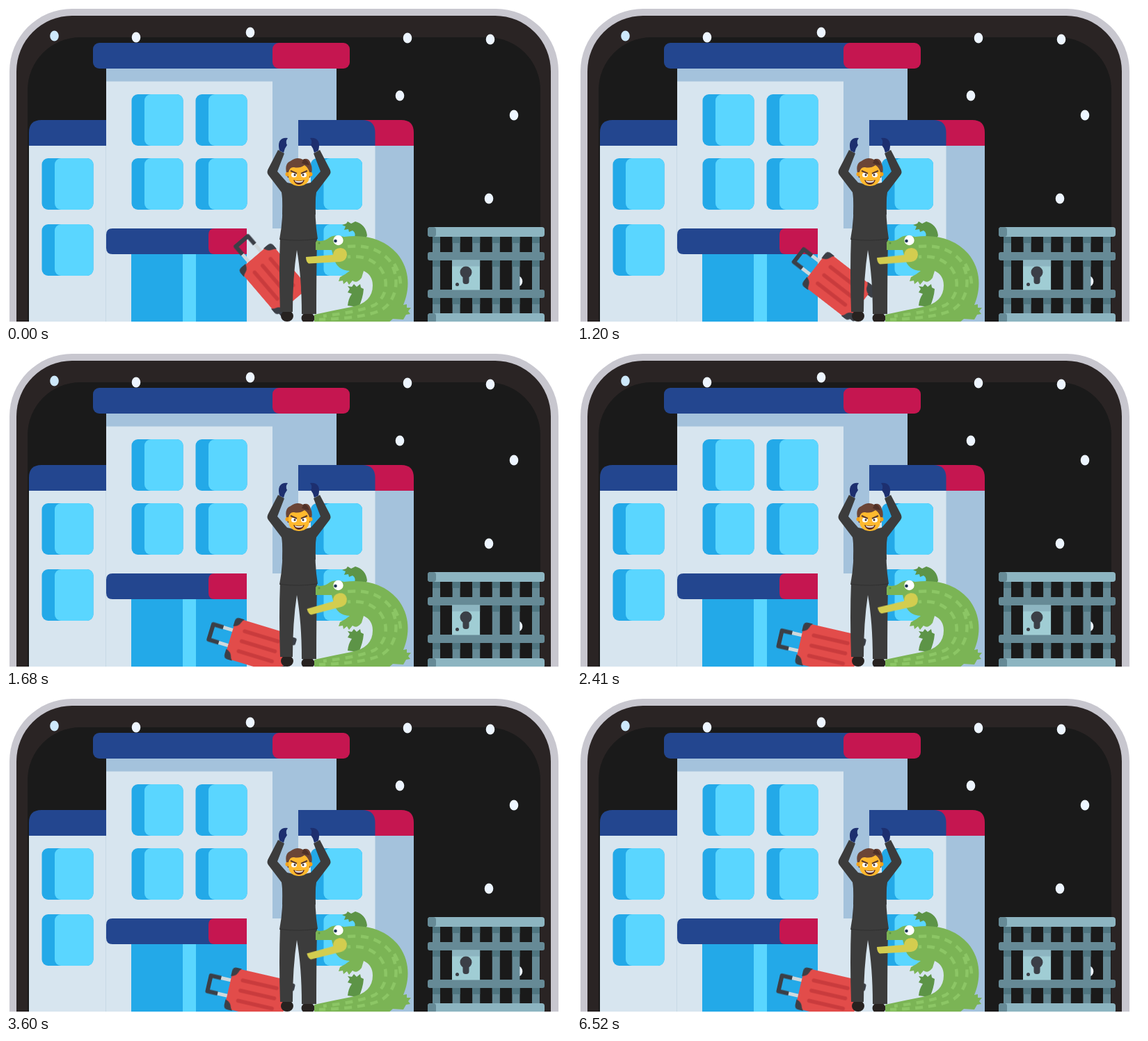
Recreate the animation shown at these times as an HTML page. Size 812x456 px, loop 6.97 s.

```html
<!DOCTYPE html>
<html lang="en">
<head>
<meta charset="utf-8">
<title>Night at the hotel</title>
<style>
  html, body { margin: 0; width: 100%; height: 100%; overflow: hidden; background: #fff; }
  svg { display: block; width: 812px; height: 456px; }
  .navy { fill: #23468f; }
  .red { fill: #c51650; }
  .wall { fill: #d7e5ef; }
  .side { fill: #a4c2dc; }
  .pane { fill: #23a9e8; }
  .glow { fill: #5ad6ff; }
  .suit { fill: #3c3c3c; }
  .skin { fill: #7bb455; }
  .limb { fill: #5d9447; }
  .dash { fill: none; stroke: #8cc665; stroke-width: 4.5; stroke-dasharray: 11 8; }
  .steel { fill: #668a96; }
  .light { fill: #8db5c1; }
  .shade { fill: #4f7580; }
  .trim { fill: #3b3f47; }
  #jaw { transform-origin: 481px 358px; }
  #case { transform-origin: 429px 447px; }
</style>
</head>
<body>
<svg viewBox="0 0 812 456">
  <defs>
    <clipPath id="view"><rect width="812" height="454"/></clipPath>
    <g id="window">
      <rect class="pane" width="74" height="74" rx="9"/>
      <rect class="glow" x="18.5" width="55.5" height="74" rx="9"/>
    </g>
    <g id="sleeve">
      <path class="suit" d="M391 207 L400 212 L390 238 L404 254 L421 258 V300 H397 Q398 280 396 268 L377 243 Q374 239 377 234Z"/>
      <path fill="#1d2f6f" d="M405 190 Q396 189 393 195 Q391 200 393 208 L399 211 Q400 205 404 200 Q401 195 405 190Z"/>
    </g>
  </defs>

  <g clip-path="url(#view)">
    <!-- phone -->
    <rect x="5" y="4" width="789" height="700" rx="90" fill="#c8c7cf"/>
    <rect x="15" y="14" width="768" height="700" rx="80" fill="#2a2424"/>
    <rect x="31" y="45" width="737" height="700" rx="76" fill="#1a1a1a"/>
    <g id="stars" fill="#edf5ff"></g>

    <!-- building -->
    <rect class="wall" x="33" y="200" width="111" height="256"/>
    <path class="navy" d="M33 201 V182 Q33 164 51 164 H144 V201Z"/>
    <rect class="wall" x="144" y="90" width="239" height="366"/>
    <rect class="side" x="383" y="90" width="92" height="366"/>
    <rect class="side" x="144" y="90" width="239" height="18.500"/>
    <path d="M143.500 201 V456" stroke="#c7d9e6"/>
    <rect class="navy" x="125" y="53" width="300" height="37" rx="9"/>
    <rect class="red" x="383" y="53" width="111" height="37" rx="9"/>
    <rect class="side" x="520" y="200" width="66" height="256"/>
    <rect class="wall" x="420" y="200" width="110.500" height="256"/>
    <path class="red" d="M505 164 H568 Q586 164 586 182 V201 H505Z"/>
    <path class="navy" d="M420 164 H512 Q530.500 164 530.500 182 V201 H420Z"/>
    <rect class="wall" x="346" y="320" width="75" height="136"/>
    <rect class="pane" x="180" y="350" width="166" height="106"/>
    <rect class="glow" x="254" y="350" width="19" height="106"/>
    <path class="navy" d="M153 320 H310 V357 H153 Q144 357 144 348 V329 Q144 320 153 320Z"/>
    <path class="red" d="M300 320 H346 V357 H300 Q291 357 291 348 V329 Q291 320 300 320Z"/>
    <g id="windows"></g>

    <!-- cage -->
    <g id="bars"></g>
    <g class="steel">
      <rect x="606" y="354" width="168" height="12" rx="3"/>
      <rect x="606" y="408" width="168" height="12" rx="3"/>
    </g>
    <g id="rails"></g>
    <rect x="641" y="365.500" width="40" height="43" fill="#a0cdd4"/>
    <rect class="light" x="641" y="365.500" width="40" height="9"/>
    <circle class="trim" cx="661" cy="383" r="8.500"/>
    <rect class="trim" x="656.500" y="384" width="9" height="16" rx="4"/>
    <circle class="trim" cx="648.500" cy="400.500" r="2.500"/>

    <!-- suitcase -->
    <g id="case">
      <g transform="translate(385 392.5) rotate(-40.5)">
        <path d="M-11.500 -40 V-60 M11.500 -40 V-60" stroke="#cfd8dc" stroke-width="5"/>
        <path d="M-11.500 -56 V-71 H11.500 V-56" fill="none" stroke="#3b3f47" stroke-width="6" stroke-linejoin="round"/>
        <rect class="trim" x="-27" y="38" width="11" height="12" rx="3"/>
        <rect class="trim" x="16" y="38" width="11" height="12" rx="3"/>
        <rect x="-30" y="-42" width="60" height="84" rx="7" fill="#e24c4a"/>
        <path d="M-15 -25 V25 M0 -25 V25 M15 -25 V25" stroke="#c93b3d" stroke-width="5.500" stroke-linecap="round"/>
        <g class="trim">
          <path id="corner" d="M-31 -30 V-37 Q-31 -43 -25 -43 H-17 Q-19 -36 -24 -34 Q-28 -33 -31 -30Z"/>
          <use href="#corner" transform="scale(-1 1)"/>
          <use href="#corner" transform="scale(1 -1)"/>
          <use href="#corner" transform="scale(-1 -1)"/>
        </g>
      </g>
    </g>

    <!-- burglar -->
    <ellipse cx="404" cy="446" rx="9" ry="8" fill="#272220"/>
    <ellipse cx="434" cy="449" rx="9.500" ry="8" fill="#272220"/>
    <path class="suit" d="M394 333 H447 Q446 390 446 443 H425 Q425 390 418 351 Q412 390 412 440 H394 Q392 380 394 333Z"/>
    <use href="#sleeve"/>
    <use href="#sleeve" transform="matrix(-1 0 0 1 842 0)"/>
    <path class="suit" d="M397 270 H445 Q443 305 448 335 Q421 340 393 336 Q399 305 397 270Z"/>
    <path d="M394 335.500 Q421 339 447 335" fill="none" stroke="#303030"/>
    <path d="M405 247 Q398 227 409 223 Q418 216 427 221 Q435 217 438 227 Q442 235 437 247Z" fill="#6b4536"/>
    <circle cx="404.500" cy="242" r="3" fill="#f2a21c"/>
    <circle cx="437.500" cy="242" r="3" fill="#f2a21c"/>
    <path d="M406 239 Q408 231 414 232 Q422 234 429 229 Q434 232 436 239 Q438 258 421 259 Q404 258 406 239Z" fill="#ffb92e"/>
    <path d="M428 220 Q434 221 436 229 Q431 229 425 226Z" fill="#4f3128"/>
    <ellipse cx="414" cy="243" rx="4" ry="3.500" fill="#fff"/>
    <ellipse cx="428" cy="243" rx="4" ry="3.500" fill="#fff"/>
    <circle cx="415" cy="243" r="1.500" fill="#3b2a24"/>
    <circle cx="427" cy="243" r="1.500" fill="#3b2a24"/>
    <path d="M409 237 L418 241 M433 237 L424 241" stroke="#5b392c" stroke-width="2"/>
    <path d="M413 250 Q421 253 429 250 Q427 257 421 257 Q415 257 413 250Z" fill="#5b2d25"/>
    <path d="M415 251 Q421 253.500 427 251 L426 253 Q421 255 416 253Z" fill="#fff"/>

    <!-- crocodile -->
    <path class="limb" d="M500 336 Q504 326 498 323 L493 325 L492 321 L486 322 L488 317 L483 315 L489 313 L491 310 L496 313 L502 310 Q517 314 519 330 L515 340Z"/>
    <path class="limb" d="M491 431 Q492 421 497 414 L491 412 L494 407 L491 403 L497 404 L500 400 L504 404 L509 400 L510 405 L514 407 Q513 420 507 433Z"/>
    <path class="skin" d="M447 337 Q456 340 465 333 Q472 328 486 332 Q535 326 562 356 C582 380 580 409 571 430 L576 429 L576 434 L582 434 L578 439 L581 443 L575 444 L571 451 L556 450 L549 456 H443 V444 Q470 438 496 433 Q527 427 527 402 Q527 387 514 381 L511 391 Q504 400 498 395 L493 401 L490 396 L485 400 L484 395 L478 396 L480 390 Q488 386 494 381 Q475 380 471 362 L468 351 H445 V340Z"/>
    <path class="dash" d="M491 346 Q530 342 551 366 C568 392 561 424 540 437 Q515 449 450 451"/>
    <path class="dash" d="M491 361 Q520 357 538 377 C552 397 546 419 530 430 Q508 440 456 446" stroke-dashoffset="7"/>
    <path class="dash" d="M558 371 Q568 388 567 405"/>
    <circle cx="477.500" cy="337" r="7.200" fill="#fff"/>
    <circle cx="473.500" cy="338" r="2.300" fill="#1d3557"/>
    <circle cx="450" cy="341" r="1.500" fill="#5d9447"/>
    <path id="jaw" fill="#d3cd4f" d="M431 361 L470 358 Q471 348 481 348 Q490 349 490 358 Q489 367 480 368 L435 370.500 Q431 368 431 361Z"/>
  </g>
</svg>

<script>
const LOOP = 6970;
const byId = id => document.getElementById(id);

function add(parent, tag, attrs) {
  const el = document.createElementNS('http://www.w3.org/2000/svg', tag);
  for (const key in attrs) el.setAttribute(key, attrs[key]);
  byId(parent).appendChild(el);
}

const box = (parent, cls, x, y, width, height, rx = 0) =>
  add(parent, 'rect', { class: cls, x, y, width, height, rx });

[[187, 45], [351, 38], [577, 46], [696, 48], [566, 129], [730, 157], [694, 277], [736, 396]]
  .forEach(([cx, cy]) => add('stars', 'ellipse', { cx, cy, rx: 6.3, ry: 7.6 }));
add('stars', 'ellipse', { cx: 69.5, cy: 43, rx: 6.3, ry: 7.6, fill: '#cde8fb' });

[[180.5, 127], [272.5, 127], [180.5, 219], [272.5, 219], [51.5, 219], [51.5, 314], [438, 219], [438, 314]]
  .forEach(([x, y]) => add('windows', 'use', { href: '#window', x, y }));

for (let i = 0; i < 6; i++) {
  const x = 613 + i * 28.6;
  box('bars', 'steel', x, 325, 11, 125);
  for (const y of [332, 366, 420]) box('bars', 'shade', x, y, 11, 9);
}
for (const y of [318, 442]) {
  box('rails', 'light', 606, y, 168, 14, 4);
  box('rails', 'steel', 606, y, 12, 14, 4);
}

// Each step: [time in ms, angle in degrees], eased towards the next one.
function swing(id, easing, steps) {
  const frames = steps.map(([ms, deg]) => ({
    offset: ms / LOOP, transform: `rotate(${deg}deg)`, easing
  }));
  byId(id).animate(frames, { duration: LOOP, iterations: Infinity });
}

swing('case', 'cubic-bezier(.5, 1, .89, 1)',
  [[0, 0], [1030, 0], [2000, -36.5], [LOOP, -36.5]]);
swing('jaw', 'cubic-bezier(.37, 0, .63, 1)',
  [[0, 0], [1020, 0], [1993, -15], [2967, 0], [3950, -15], [4920, 0], [LOOP, 0]]);
</script>
</body>
</html>
```
